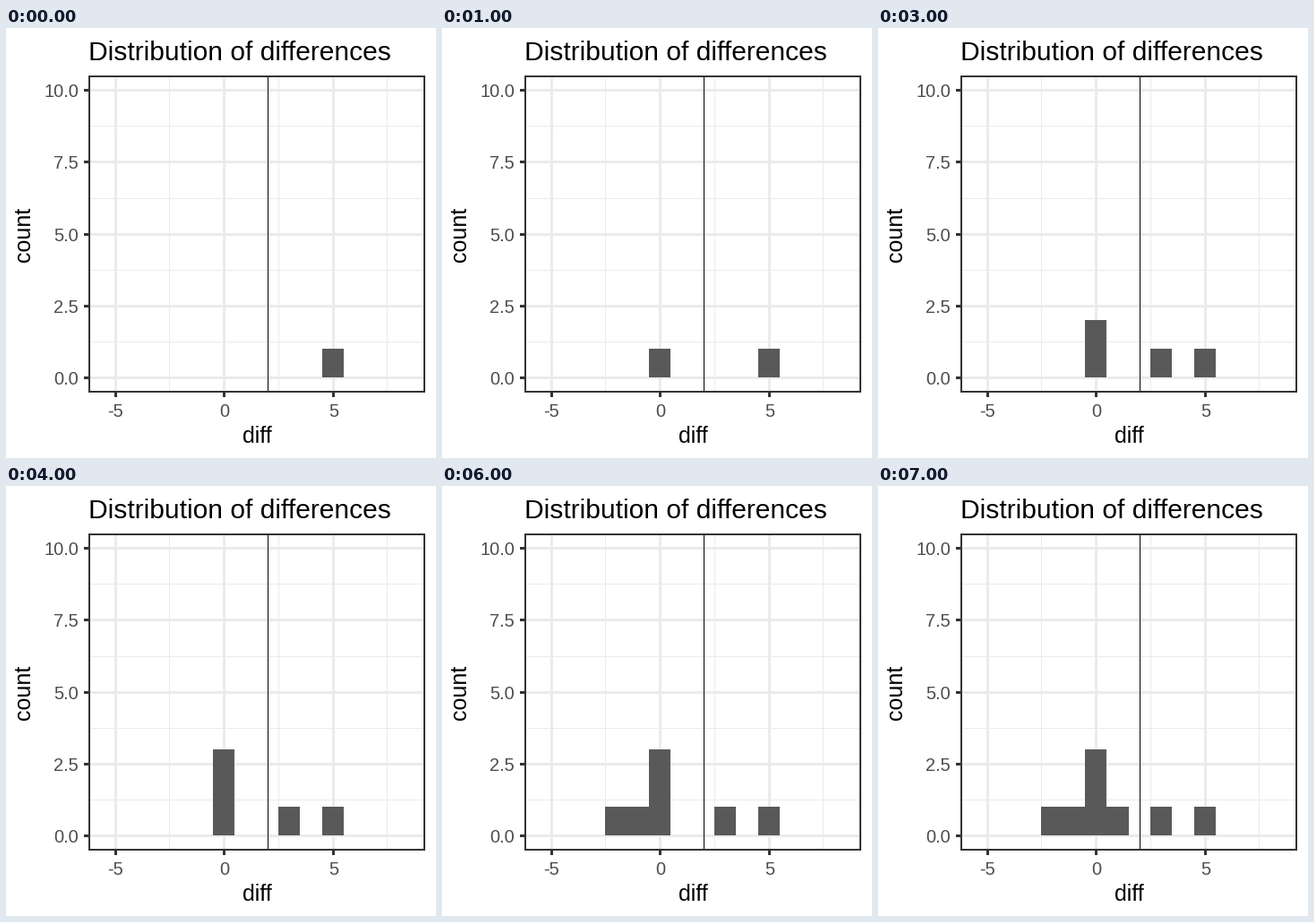
Recreate the animation shown at these times as a matplotlib script. Size 480 by 480 pixels, loop 8 s.

```python
import math

import matplotlib.pyplot as plt
from matplotlib.animation import FuncAnimation
from matplotlib.patches import Rectangle

SIZE, DPI = 480, 100
X0, X_UNIT = 243.7, 24.3
Y0, Y_UNIT = 390.4, 32.06
LEFT, TOP, RIGHT, BOTTOM = 92, 53, 468, 407
GRID, DARK, BAR, LABEL = "#EBEBEB", "#333333", "#595959", "#4D4D4D"

# Differences in the order they are drawn, one per second
DIFFS = [5, 0, 3, 0, 0, -2, -1, 1]

plt.rcParams["font.family"] = "Liberation Sans"
fig = plt.figure(figsize=(SIZE / DPI, SIZE / DPI), dpi=DPI, facecolor="white")
ax = fig.add_axes([0, 0, 1, 1])
ax.set_xlim(0, SIZE)
ax.set_ylim(SIZE, 0)
ax.axis("off")


def px(x):
    return X0 + x * X_UNIT


def py(y):
    return Y0 - y * Y_UNIT


def box(x1, y1, x2, y2, color, z):
    """Fill a pixel-aligned box."""
    patch = Rectangle((x1, y1), x2 - x1, y2 - y1, facecolor=color,
                      linewidth=0, antialiased=False, zorder=z)
    return ax.add_patch(patch)


def text(x, y, s, size, color="black", **kw):
    kw.setdefault("va", "baseline")
    ax.text(x, y, s, fontsize=size * 72 / DPI, color=color, **kw)


# Minor grid
for x in (-2.5, 2.5, 7.5):
    c = math.floor(px(x))
    box(c, TOP, c + 1, BOTTOM, GRID, 1)
for y in (1.25, 3.75, 6.25, 8.75):
    c = math.floor(py(y))
    box(LEFT, c, RIGHT, c + 1, GRID, 1)

# Major grid, ticks and tick labels
for x in (-5, 0, 5):
    c = math.floor(px(x))
    box(c - 1, TOP, c + 2, BOTTOM, GRID, 2)
    box(c - 1, BOTTOM, c + 2, BOTTOM + 5, DARK, 2)
    text(c + 0.5, 434, str(x).replace("\u2212", "-"), 20, LABEL, ha="center")
for y in (0, 2.5, 5, 7.5, 10):
    c = math.floor(py(y))
    box(LEFT, c - 1, RIGHT, c + 2, GRID, 2)
    box(LEFT - 5, c - 1, LEFT, c + 2, DARK, 2)
    text(81, c + 8, f"{y:.1f}", 20, LABEL, ha="right")

# Reference line and panel border
mean_x = math.floor(px(2))
box(mean_x, TOP, mean_x + 1, BOTTOM, "black", 4)
box(LEFT, TOP, RIGHT, TOP + 2, DARK, 5)
box(LEFT, BOTTOM - 2, RIGHT, BOTTOM, DARK, 5)
box(LEFT, TOP, LEFT + 2, BOTTOM, DARK, 5)
box(RIGHT - 2, TOP, RIGHT, BOTTOM, DARK, 5)

text(92, 36, "Distribution of differences", 30, ha="left")
text(280, 463, "diff", 25, ha="center")
text(32, 230, "count", 25, ha="right", va="center", rotation=90,
     rotation_mode="default")

base = math.floor(Y0)
bars = {d: box(math.floor(px(d - 0.5)), base, math.floor(px(d + 0.5)), base, BAR, 3)
        for d in sorted(set(DIFFS))}


def update(i):
    seen = DIFFS[:i + 1]
    for d, bar in bars.items():
        top = math.floor(py(seen.count(d)))
        bar.set_y(top)
        bar.set_height(base - top)
    return list(bars.values())


anim = FuncAnimation(fig, update, frames=len(DIFFS), interval=1000,
                     repeat=True, repeat_delay=0, blit=False)
plt.show()
```
